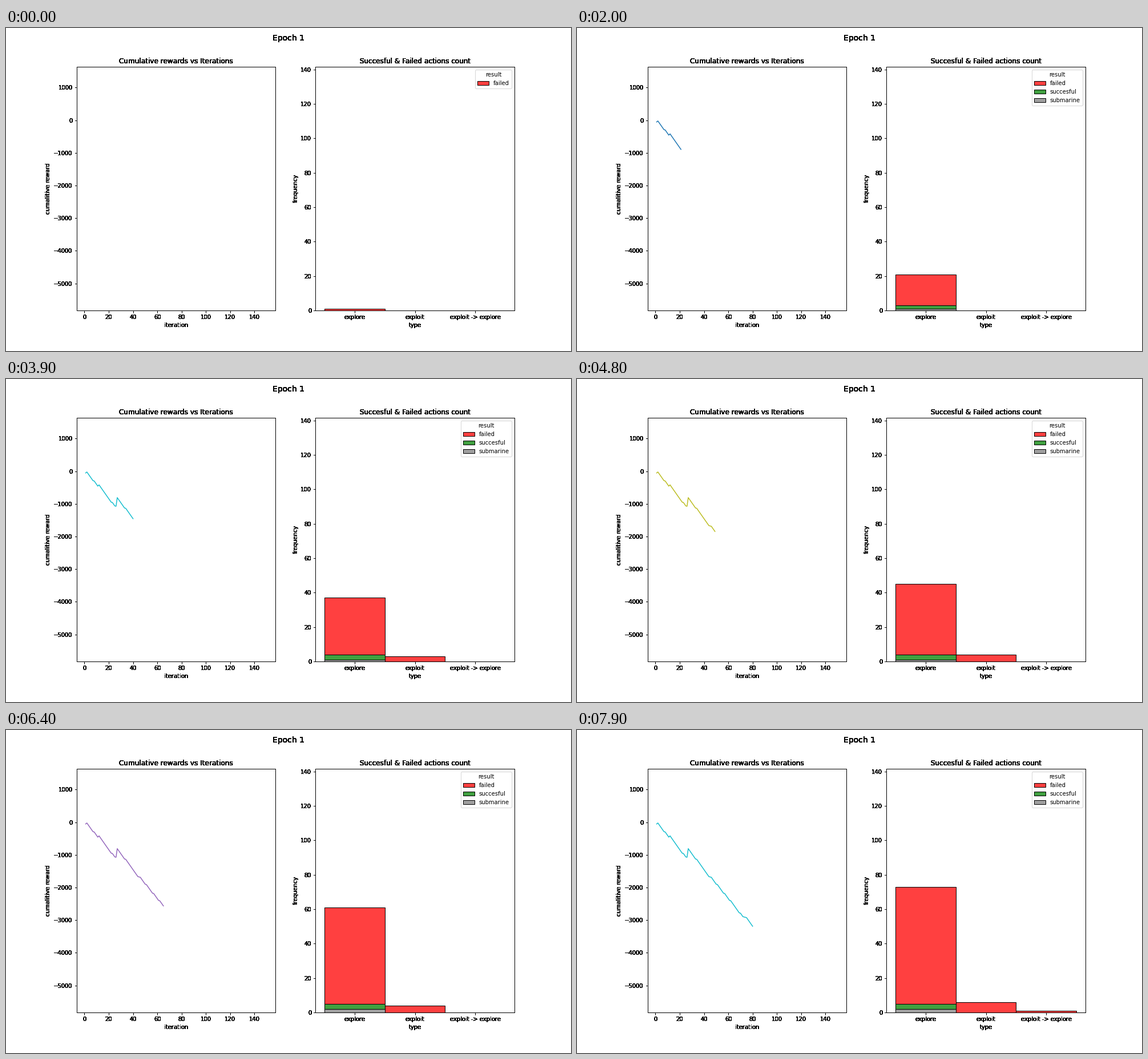
Animation, 990 px wide and 566 px high, one loop 8 s. Source, as a matplotlib script:

```python
import numpy as np
import matplotlib.pyplot as plt
from matplotlib.animation import FuncAnimation
from matplotlib.colors import to_rgba

STEPS = 80
KINDS = ["explore", "exploit", "exploit -> explore"]
COLORS = {"failed": "red", "succesful": "green", "submarine": "gray"}
RESULTS = list(COLORS)

# Every iteration is a failed exploration except for these
GAINS = {2: 30, 12: 40, 27: 265}
SUBMARINES = (8, 62)
EXPLOITS = (23, 26, 34, 45, 73, 74)
FALLBACK = 75
MILD = (46, 51, 57, 70)
FAIL_COST, MILD_COST = -53, -10


def play(i):
    """Return kind index, result index and reward of iteration i."""
    if i in GAINS:
        return 0, 1, GAINS[i]
    if i in SUBMARINES:
        return 0, 2, MILD_COST
    if i in EXPLOITS:
        return 1, 0, MILD_COST
    if i == FALLBACK:
        return 2, 0, MILD_COST
    return 0, 0, MILD_COST if i in MILD else FAIL_COST


iters = np.arange(1, STEPS + 1)
kind, result, reward = np.array([play(i) for i in iters]).T
totals = np.cumsum(reward)


def darken(img, dpi):
    """Thicken antialiased black ink as if it were painted many times."""
    out = np.zeros_like(img)
    out[..., 3] = 1 - (1 - img[..., 3]) ** 12
    return out, 0, 0


plt.rcParams["axes.linewidth"] = 1
fig, (left, right) = plt.subplots(1, 2, figsize=(990 / 72, 566 / 72), dpi=72)
fig.subplots_adjust(left=0.125, right=0.9, bottom=0.1255, top=0.8805,
                    wspace=0.2)
heading = fig.suptitle("Epoch 1", fontsize=14)

left.set(title="Cumulative rewards vs Iterations", xlabel="iteration",
         ylabel="cumalitive reward", xlim=(-6.45, 157.45),
         ylim=(-5827, 1643), xticks=range(0, 141, 20),
         yticks=range(-5000, 1001, 1000))
right.set(title="Succesful & Failed actions count", xlabel="type",
          ylabel="frequency", xlim=(-0.65, 2.65), ylim=(0, 141.75),
          yticks=range(0, 141, 20))
right.set_xticks(range(3), KINDS)

for part in (heading, left.xaxis, left.yaxis, left.title,
             right.xaxis, right.yaxis, right.title):
    part.set_agg_filter(darken)

line, = left.plot([], [], lw=1.5)
bars = {name: right.bar(range(3), 0, width=1, lw=1, edgecolor="black",
                        facecolor=to_rgba(color, 0.75), label=name)
        for name, color in COLORS.items()}


def update(frame):
    n = frame + 1
    line.set_data(iters[:n], totals[:n])
    line.set_color(f"C{frame % 10}")

    # Stack upwards: submarine, succesful, failed
    base = np.zeros(3)
    shown = []
    for r in reversed(range(len(RESULTS))):
        group = bars[RESULTS[r]]
        counts = np.bincount(kind[:n][result[:n] == r], minlength=3)
        for bar, y, h in zip(group, base, counts):
            bar.set_y(y)
            bar.set_height(h)
            bar.set_visible(h > 0)
        base += counts
        if counts.any():
            shown.insert(0, group)
    right.legend(handles=shown, title="result", loc="upper right")


anim = FuncAnimation(fig, update, frames=STEPS, interval=100,
                     init_func=lambda: update(0), repeat=True,
                     repeat_delay=0, blit=False)
plt.show()
```
